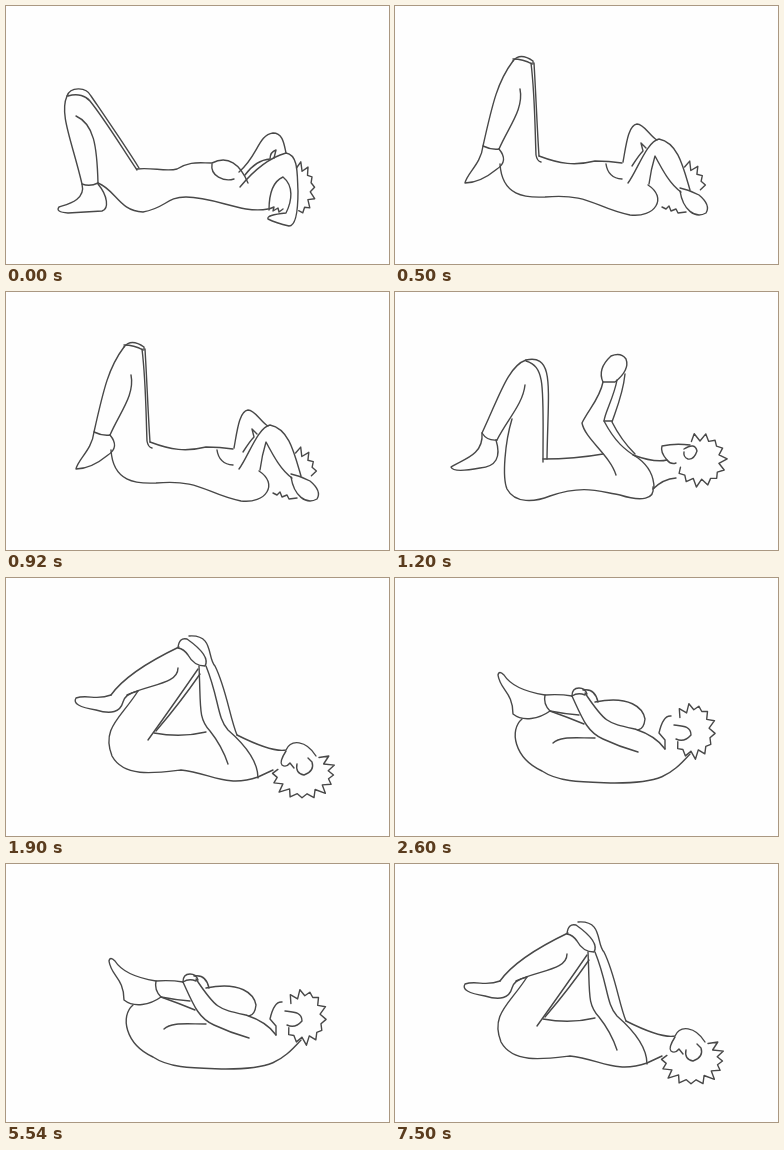
These frames come from a looping animation (383x258 px, 8 s). An HTML page:

```html
<!DOCTYPE html>
<html lang="en">
<head>
<meta charset="utf-8">
<title>Floor exercise</title>
<style>
html, body { margin: 0; width: 100%; height: 100%; overflow: hidden; background: #fefefe; }
svg { display: block; width: 383px; height: 258px; }
path { fill: none; stroke: #484848; stroke-width: 1.4; stroke-linecap: round; stroke-linejoin: round; }
.pose { visibility: hidden; animation: 8s step-end infinite; }
#rest { animation-name: rest; }
#lift { animation-name: lift; }
#reach { animation-name: reach; }
#grasp { animation-name: grasp; }
#hug { animation-name: hug; }
@keyframes rest { 0% { visibility: visible } 6.25%, 100% { visibility: hidden } }
@keyframes lift { 0% { visibility: hidden } 6.25% { visibility: visible } 15%, 100% { visibility: hidden } }
@keyframes reach { 0% { visibility: hidden } 15% { visibility: visible } 23.75%, 100% { visibility: hidden } }
@keyframes grasp { 0% { visibility: hidden } 23.75% { visibility: visible } 32.5% { visibility: hidden } 93.75%, 100% { visibility: visible } }
@keyframes hug { 0% { visibility: hidden } 32.5% { visibility: visible } 93.75%, 100% { visibility: hidden } }
</style>
</head>
<body>
<svg viewBox="0 0 383 258">
  <g class="pose" id="rest">
    <!-- legs -->
    <path d="M61 90C64 81 80 80 85 90C100 112 118 138 133 162"/>
    <path d="M62 90C72 87 80 90 84 95C100 115 118 145 131 164"/>
    <path d="M61 90C53 108 66 135 76 178Q84 181 92 177"/>
    <path d="M70 110C88 118 91 140 92 177"/>
    <path d="M76 178C80 194 62 198 53 201Q49 206 62 207L96 205C103 203 102 190 92 178"/>
    <!-- trunk -->
    <path d="M92 177C110 184 113 205 137 206C160 202 160 191 180 191C210 191 235 208 262 203"/>
    <path d="M131 163C145 161 160 166 171 163C184 155 192 157 206 157C222 149 234 158 242 177"/>
    <path d="M206 158C204 170 218 176 228 173"/>
    <!-- arms -->
    <path d="M233 166C252 150 252 129 267 127C277 127 278 138 280 147"/>
    <path d="M239 169Q250 154 264 153Q264 146 270 144L268 152"/>
    <path d="M234 181C248 164 262 152 280 147C293 149 291 170 292 185C292 200 291 220 283 220Q270 217 262 213Q260 209 280 207C286 195 288 180 277 171C268 175 263 185 263 204"/>
    <path d="M263 203l5-2-1 4 5-3 1 4 4-3"/>
  </g>
  <g class="pose" id="lift">
    <path d="M118 55Q125 46 138 55v3"/>
    <path d="M118 53Q128 53 137 58"/>
    <path d="M118 55C103 75 98 95 88 140Q96 144 104 143"/>
    <path d="M136 57C140 90 140 125 141 149Q142 155 146 156"/>
    <path d="M139 57C141 90 142 120 144 150"/>
    <path d="M125 83C129 103 114 120 104 143"/>
    <path d="M88 140C86 158 72 167 70 177Q85 177 102 163Q114 155 104 143"/>
    <path d="M105 158C107 190 130 192 150 191C195 187 200 202 235 209C260 212 273 192 253 179"/>
    <path d="M144 150C165 158 180 160 200 155Q214 155 227 157"/>
    <path d="M211 158Q213 172 227 173"/>
    <path d="M228 156C231 140 233 119 242 118C249 118 255 130 262 134"/>
    <path d="M237 160Q244 149 248 145L246 137L251 142"/>
    <path d="M233 177C242 165 252 135 264 133C283 137 288 160 295 184"/>
    <path d="M285 182Q295 184 304 189Q316 199 311 207C300 213 288 204 285 185"/>
    <path d="M286 186C275 178 268 165 260 150Q256 163 254 178"/>
    <path d="M267 201l4 2 3-3 2 5 5-2 2 4 8-1"/>
  </g>
  <g class="pose" id="reach">
    <path d="M131 68C113 74 104 105 87 141Q92 149 102 148"/>
    <path d="M131 68C160 62 153 95 152 167"/>
    <path d="M131 69C151 75 148 95 148 170"/>
    <path d="M130 93C128 112 112 128 102 148"/>
    <path d="M87 141C89 164 66 168 56 175Q58 181 85 176Q109 174 101 148"/>
    <path d="M117 127C110 150 107 185 112 197C120 212 140 210 155 204C190 192 205 200 225 203C247 210 260 207 258 195"/>
    <path d="M148 167Q180 167 208 162"/>
    <path d="M208 90C205 106 194 117 187 131C190 147 215 163 221 183"/>
    <path d="M222 88C219 105 210 120 209 129C220 150 230 158 243 166Q259 178 259 196"/>
    <path d="M230 82C228 102 221 118 217 130Q226 148 240 162"/>
    <path d="M208 90Q202 77 216 64Q226 60 231 67Q235 78 220 90Z"/>
    <path d="M209 129h8"/>
    <!-- head -->
    <path d="M238 163Q260 171 272 168Q265 160 267 154Q280 151 295 153"/>
    <path d="M272 168Q276 173 281 171"/>
    <path d="M289 157Q300 150 302 159Q299 168 293 167Q288 165 289 160"/>
    <path d="M258 197Q268 187 281 186"/>
  </g>
  <g class="pose" id="grasp">
    <path d="M172 70Q173 59 181 61Q205 78 199 88Q188 88 182 77Q178 71 172 70"/>
    <path d="M183 58C208 56 201 80 209 88C220 110 224 140 231 157"/>
    <path d="M173 69C150 80 120 96 105 117"/>
    <path d="M105 117C90 123 82 116 70 120Q65 128 90 132Q113 139 117 124Q119 116 132 113"/>
    <path d="M121 117C145 106 172 106 172 90"/>
    <path d="M132 113C115 140 95 150 106 178C118 200 150 195 175 192C205 195 220 210 252 199L267 192"/>
    <path d="M193 88C195 130 192 140 204 153Q216 168 222 186"/>
    <path d="M200 88C213 120 211 140 222 152Q252 178 252 200"/>
    <path d="M192 91Q170 123 142 162"/>
    <path d="M194 96Q174 125 150 153"/>
    <path d="M148 155Q175 160 200 154"/>
    <path d="M231 157C255 169 270 174 280 172C285 161 300 162 310 178"/>
    <path d="M280 173Q273 184 276 187Q280 190 284 185L288 190"/>
    <path d="M291 186Q289 195 298 197Q309 193 306 184L302 180"/>
  </g>
  <g class="pose" id="hug">
    <path d="M150 117C125 113 114 105 109 97Q104 92 103 97C105 112 118 114 118 136C128 144 144 141 155 133"/>
    <path d="M177 118Q165 116 150 117Q148 126 155 133Q170 136 184 137"/>
    <path d="M177 118Q177 110 184 110Q190 110 192 116"/>
    <path d="M177 118Q183 114 190 117"/>
    <path d="M188 112Q200 110 203 124"/>
    <path d="M200 124C235 117 248 130 250 141Q249 151 243 152"/>
    <path d="M177 118C187 140 192 154 208 161Q225 169 243 174"/>
    <path d="M190 115C210 145 212 145 240 151Q261 158 270 171"/>
    <path d="M127 141C114 152 119 180 147 193C165 205 190 204 220 205C265 205 275 198 295 176"/>
    <path d="M155 133Q172 139 189 146"/>
    <path d="M158 165C165 158 180 160 200 160"/>
    <path d="M276 138Q268 137 264 155L270 162V171"/>
    <path d="M279 147C288 148 296 148 296 157Q289 165 281 161"/>
  </g>
</svg>
<script>
// Jagged hair along an elliptical arc, angles in degrees.
function hair(id, cx, cy, rx, ry, from, to, tips) {
  const pts = [];
  for (let i = 0; i <= tips * 2; i++) {
    const a = (from + (to - from) * i / (tips * 2)) * Math.PI / 180;
    const r = (i % 2 ? 1 : 0.78) + 0.05 * Math.sin(i * 2.3);
    pts.push([cx + rx * r * Math.cos(a), cy + ry * r * Math.sin(a)].map(v => v.toFixed(1)));
  }
  const path = document.createElementNS("http://www.w3.org/2000/svg", "path");
  path.setAttribute("d", "M" + pts.join("L"));
  document.getElementById(id).append(path);
}
hair("rest", 290, 183, 19, 27, -88, 80, 7);
hair("lift", 288, 182, 23, 27, -85, 5, 4);
hair("reach", 305, 168, 26, 26, -115, 160, 11);
hair("grasp", 297, 195, 32, 26, -50, 190, 11);
hair("hug", 298, 153, 22, 27, -140, 150, 11);
</script>
</body>
</html>
```
